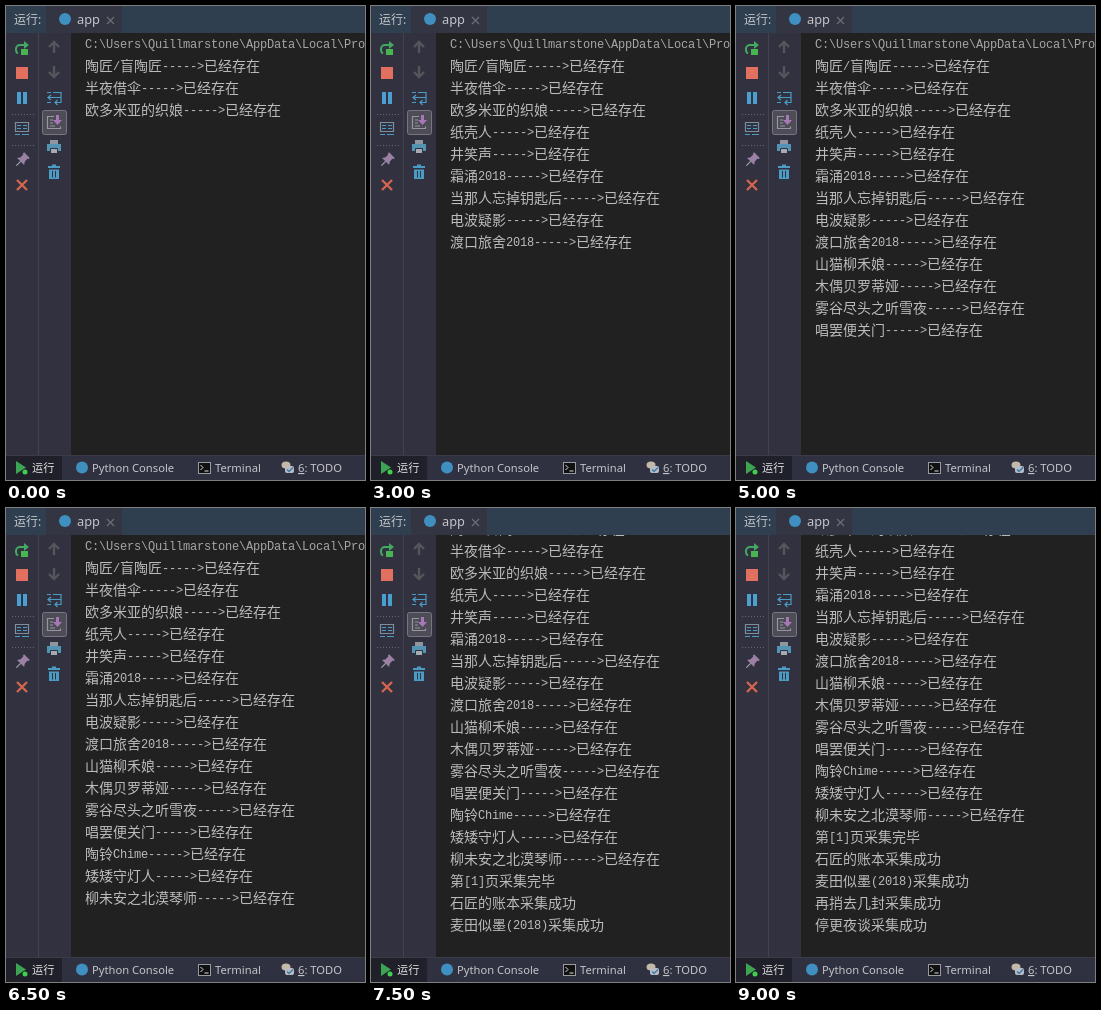
Write an HTML page that moves like this. It is 359 by 474 pixels and loops after 9.5 s.

```html
<!DOCTYPE html>
<html lang="zh-CN">
<head>
<meta charset="utf-8">
<title>Run console</title>
<style>
  html, body { margin: 0; width: 100%; height: 100%; overflow: hidden; background: #212121; }
  svg { display: block; }
  .ui { font: 11.2px "Noto Sans", "Noto Sans CJK SC", sans-serif; fill: #c3c5c9; }
  .console { font: 14px "Noto Sans CJK SC", sans-serif; fill: #bbb; }
  .ascii { font: 12px "Liberation Mono", monospace; baseline-shift: 1px; }
  .line { fill: none; stroke-width: 1.6; }
  .thin { stroke-width: 1.2; }
  .blue { stroke: #4b9cc4; }
  .dim { stroke: #55555c; stroke-width: 2.4; }
</style>
</head>
<body>
<svg width="359" height="474" viewBox="0 0 359 474">
  <defs><clipPath id="view"><rect x="65" y="27" width="294" height="422"/></clipPath></defs>
  <rect width="359" height="474" fill="#212121"/>

  <!-- console -->
  <g clip-path="url(#view)"><g id="rows" class="console"></g></g>

  <!-- header -->
  <rect width="359" height="27" fill="#303f50"/>
  <rect x="40" width="76" height="27" fill="#343543"/>
  <g class="ui">
    <text x="8" y="18" font-size="12">运行:</text>
    <text x="71" y="18" font-size="12.8">app</text>
  </g>
  <circle cx="59" cy="13" r="6" fill="#3f8fc0"/>
  <path class="line thin" stroke="#6c6e76" d="M101 11l7 7m0-7l-7 7"/>

  <!-- run column -->
  <path fill="#32313f" d="M0 27h65v423H0z"/>
  <path fill="none" stroke="#43434d" d="M32.5 27v423"/>
  <path fill="none" stroke="#666672" stroke-dasharray="1 2" d="M6 108.500h22M6 139.500h22"/>
  <path class="line" stroke="#43a862" style="stroke-width:2" d="M19 39h-5a4 4 0 0 0-4 4v1a4 4 0 0 0 2 3.500"/>
  <path fill="#43a862" d="M18 35l5 4-5 4z"/>
  <path fill="#48b552" d="M15 43h7v6h-7z"/>
  <path fill="#e1705f" d="M10 61h12v12H10z"/>
  <path fill="#4b9fd0" d="M11 86h4v12h-4zM17 86h4v12h-4z"/>
  <path class="line thin" stroke="#7f8c99" d="M9.500 116.500h13v9h-13z"/>
  <path class="line thin blue" d="M11 119.500h4m2 0h4M11 122.500h4m2 0h4M9 128.500h5m2 0h7"/>
  <g transform="translate(16 154) rotate(45)">
    <path fill="#9b80a4" d="M-4-7h8v2H3v4l2 3H-5l2-3v-4h-1z"/>
    <path class="line thin" stroke="#a5a5ac" d="M0 2v6"/>
  </g>
  <path class="line" stroke="#d3654e" style="stroke-width:2.4" d="M11 174l10 10m0-10l-10 10"/>

  <!-- output column -->
  <path class="line dim" d="M48 47V36m-5 5l5-5 5 5"/>
  <path class="line dim" d="M48 60v11m-5-5l5 5 5-5"/>
  <path class="line thin blue" d="M41 86.500h4m2 0h8v5H42m3-2.500l-3 2.500 3 2.500M41 96.500h4m10-5v5h-6m2.500-2.500l-2.500 2.500 2.500 2.500"/>
  <rect x="36.5" y="104.5" width="24" height="24" rx="2" fill="#4d4c57" stroke="#777680"/>
  <path class="line thin" stroke="#96989f" d="M48 110.500h-6.500v12h13v-2M44 114h3m-3 3h3m-3 3h5"/>
  <path fill="#a678b5" d="M50 109h3v5h3l-4.500 5-4.500-5h3z"/>
  <path fill="#8f969e" d="M44 134h8v4h-8z"/>
  <path fill="#5394b5" d="M41 138h14v7H41z"/>
  <path fill="#a5abb2" stroke="#32313f" d="M44.500 142.500h7v5h-7z"/>
  <path fill="#4b9cc4" d="M42 160h4v-1.500h4v1.500h4v2H42zM43 163.500h10v9.500H43z"/>
  <path fill="none" stroke="#32313f" d="M46.500 165v6.500m3-6.500v6.500"/>

  <!-- bottom bar -->
  <rect y="450" width="359" height="24" fill="#303140"/>
  <rect y="450" width="56" height="24" fill="#20202a"/>
  <path fill="none" stroke="#3b3b48" d="M0 449.500h359"/>
  <path fill="#3da453" d="M10 455l10 6.500-10 6.500z"/>
  <circle cx="19" cy="466" r="2.500" fill="#3ed04e"/>
  <circle cx="76" cy="461.500" r="6" fill="#3f8fc0"/>
  <rect x="192.500" y="456.500" width="12" height="11" fill="#111" stroke="#999ba2"/>
  <path class="line" stroke="#ddd" style="stroke-width:1" d="M194.500 459l2.500 2.500-2.500 2.500m4 1h4"/>
  <ellipse cx="280" cy="459" rx="4.500" ry="3.500" fill="#c3b9a8"/>
  <rect x="279" y="460" width="9" height="7" rx="2" fill="#b9bcc4"/>
  <path class="line" stroke="#3c7ba5" style="stroke-width:1.4" d="M281 463.500l2 2 4-4"/>
  <g class="ui">
    <text x="26" y="466" fill="#e0e0e0">运行</text>
    <text x="86" y="466">Python Console</text>
    <text x="209" y="466">Terminal</text>
    <text x="292" y="466"><tspan text-decoration="underline">6</tspan>: TODO</text>
  </g>
</svg>
<script>
const LOOP = 9500, STEP = 500, PITCH = 22, LAST_ROW = 417;
const known = ['陶匠/盲陶匠', '半夜借伞', '欧多米亚的织娘', '纸壳人', '井笑声', '霜涌2018',
  '当那人忘掉钥匙后', '电波疑影', '渡口旅舍2018', '山猫柳禾娘', '木偶贝罗蒂娅',
  '雾谷尽头之听雪夜', '唱罢便关门', '陶铃Chime', '矮矮守灯人', '柳未安之北漠琴师'];
const added = ['石匠的账本', '麦田似墨(2018)', '再捎去几封', '停更夜谈'];
const lines = [
  'C:\\Users\\Quillmarstone\\AppData\\Local\\Programs',
  ...known.map(title => title + '----->已经存在'),
  '第[1]页采集完毕',
  ...added.map(title => title + '采集成功')
];

const group = document.getElementById('rows');

function svgNode(name, attributes, parent) {
  const node = document.createElementNS('http://www.w3.org/2000/svg', name);
  for (const key in attributes) node.setAttribute(key, attributes[key]);
  return parent.appendChild(node);
}

// Terminal grid: one 7px cell for ASCII, two for Chinese characters.
function cellPositions(line) {
  let x = 79;
  return [...line].map(char => {
    const left = x;
    x += char < '\x7f' ? 7 : 14;
    return left;
  }).join(' ');
}

const rows = lines.map((line, i) => {
  const row = svgNode('text', { x: cellPositions(line), y: 43 + i * PITCH }, group);
  for (const run of line.match(/[ -~]+|[^ -~]+/g)) {
    const style = run[0] < '\x7f' ? 'ascii' : 'chinese';
    svgNode('tspan', { class: style }, row).textContent = run;
  }
  return row;
});
rows[0].style.fill = '#a6a6a6';

function draw(now) {
  const step = Math.floor(now % LOOP / STEP);
  // The page summary arrives with the first new title; one later step is a pause.
  const count = 4 + step + (step > 13) - (step > 16);
  const scroll = Math.max(0, 38 + (count - 1) * PITCH - LAST_ROW);
  rows.forEach((row, i) => row.style.display = i < count ? '' : 'none');
  group.setAttribute('transform', `translate(0 ${-scroll})`);
  requestAnimationFrame(draw);
}
draw(performance.now());
</script>
</body>
</html>
```
